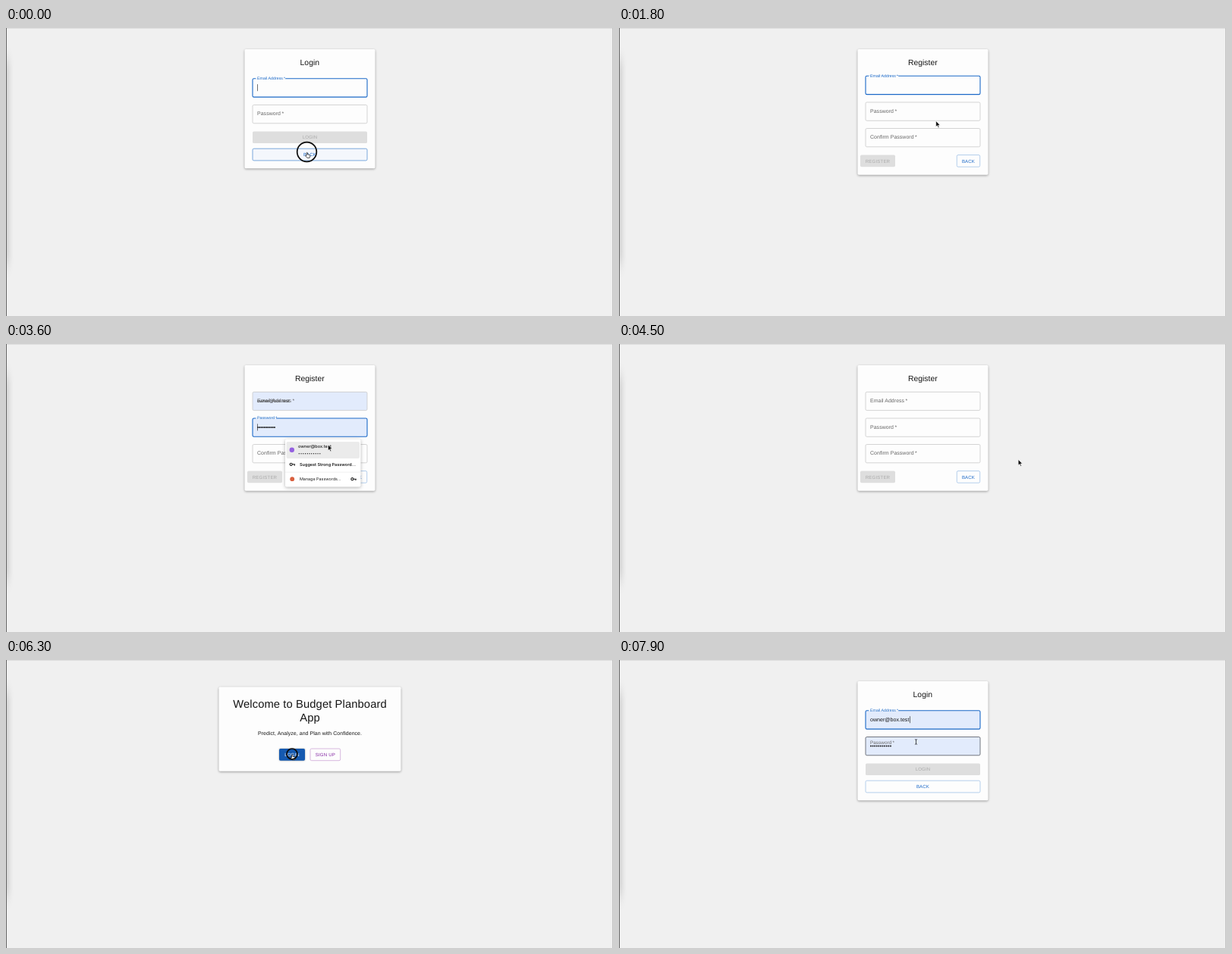
Recreate the animation shown at these times as an HTML page. Size 800x380 px, loop 8 s.

```html
<!DOCTYPE html>
<html lang="en">
<head>
<meta charset="utf-8">
<title>Login flow</title>
<style>
  html, body { margin: 0; width: 100%; height: 100%; overflow: hidden; background: #f0f0f0; }
  svg { display: block; width: 100%; height: 100%; }
  text {
    font-family: "Liberation Sans", Arial, Helvetica, sans-serif;
    text-rendering: geometricPrecision; white-space: pre;
  }
  .menu text { font-family: Inter, Roboto, sans-serif; fill: #1c1c1c; }
  .card { fill: #fdfdfd; filter: drop-shadow(0 1px 1.5px rgba(0,0,0,.36)); }
  .sheet { fill: #fff; filter: drop-shadow(0 1px 2px rgba(0,0,0,.3)); }
</style>
</head>
<body>
<svg viewBox="0 0 800 380" preserveAspectRatio="none">
  <defs>
    <linearGradient id="edge">
      <stop offset="0" stop-color="#000" stop-opacity=".13"/>
      <stop offset="1" stop-color="#000" stop-opacity="0"/>
    </linearGradient>
    <filter id="soft" x="-1" width="3"><feGaussianBlur stdDeviation="1 9"/></filter>
  </defs>
  <rect width="800" height="380" fill="#f0f0f0"/>
  <rect x="0" y="42" width="9" height="270" fill="url(#edge)" filter="url(#soft)"/>
  <rect width="800" height="1" fill="#dedede"/>
  <rect width="1" height="380" fill="#666"/>
  <rect x="799" width="1" height="380" fill="#c4c4c4"/>
  <g id="view"></g>
</svg>
<script>
const view = document.getElementById('view');
const STEP = 100, STEPS = 80;
const BLUE = '#1b69c8', PURPLE = '#8526a3', GREY = '#666';
const MAIL = 'owner@box.test';

// pointer path: step, x, y
const PATH = [
  [0, 396.5, 163.5], [3, 396.5, 163.5], [9, 419, 124], [17, 419, 124],
  [22, 407, 111], [24, 407, 111], [26, 407.5, 128], [31, 489, 171],
  [35, 431, 152], [36, 424.5, 133], [37, 424.5, 133], [42, 534, 150],
  [44, 534, 150], [49, 459, 173], [52, 459, 173], [57, 402.5, 145],
  [61, 377, 124], [66, 377, 124], [69, 377, 80], [73, 377, 80],
  [76, 391.5, 108], [80, 391.5, 108]
];
const CLICKS = [0, 10, 23, 43, 50, 62, 70, 77];

const text = (x, y, size, str, fill = '#161616', extra = '') =>
  `<text x="${x}" y="${y}" font-size="${size}" fill="${fill}" ${extra}>${str}</text>`;
const mid = (x, y, size, str, fill, extra = '') =>
  text(x, y, size, str, fill, `text-anchor="middle" ${extra}`);
const rect = (x, y, w, h, attrs) =>
  `<rect x="${x}" y="${y}" width="${w}" height="${h}" ${attrs}/>`;
const dots = (x, y, gap, size) =>
  `<path d="M${x} ${y}h${gap * 10 + .1}" stroke="#111" stroke-width="${size}" stroke-linecap="round" stroke-dasharray="0 ${gap}"/>`;
const inside = (p, x, y, w, h) => p.x >= x && p.x <= x + w && p.y >= y && p.y <= y + h;

function pointer(k) {
  const i = Math.max(1, PATH.findIndex(q => q[0] >= k));
  const [a, ax, ay] = PATH[i - 1], [b, bx, by] = PATH[i];
  const u = (k - a) / (b - a), e = u * u * (3 - 2 * u);
  return { x: ax + (bx - ax) * e, y: ay + (by - ay) * e, kind: 'arrow' };
}

// label progress, counted from the step a field gains focus
const rise = n => n <= 0 ? 0 : n === 1 ? .35 : 1;
const blink = n => Math.floor(n / 5) % 2 === 0;

function card(x, y, w, h) {
  return rect(x, y, w, h, 'rx="1.7" class="card"');
}

function field(p, y, label, o = {}) {
  const hover = !o.covered && inside(p, 325, y, 151, 24.3);
  if (hover) p.kind = 'beam';
  const up = o.up || 0, size = 6.94 - 1.74 * up;
  const stroke = o.focus ? BLUE : hover ? '#3c4048' : '#c3c3c3';
  let s = rect(325, y, 151, 24.3,
    `rx="1.7" fill="${o.fill ? '#e2ebfc' : 'none'}" stroke="${stroke}" stroke-width="${o.focus ? 1.1 : .7}"`);
  if (up === 1) s += rect(329.3, y - .8, label.length * 2.42 + 7.4, 1.7, 'fill="#fdfdfd"');
  if (o.text) s += text(331, y + 14.1, o.textSize, o.text);
  if (o.dots) s += dots(332, y + 12, o.dots, 1.9);
  s += text(331, y + 13.9 - 12.7 * up, size, label + '\u2009*', o.focus ? BLUE : GREY,
    'letter-spacing=".06"');
  if (o.caret) s += rect(o.caret, y + 7.4, .7, 9, 'fill="#333"');
  return s;
}

function button(p, x, y, w, label, style) {
  const hover = style !== 'off' && inside(p, x, y, w, 15.7);
  if (hover) p.kind = 'hand';
  const looks = {
    off: ['#dedede', 'none', '#aaa'],
    solid: [hover ? '#1559b0' : BLUE, 'none', '#fff'],
    blue: [hover ? '#f4f7fc' : 'none', hover ? '#5b93d4' : '#a3c3e8', BLUE],
    purple: [hover ? '#f9f3fa' : 'none', hover ? '#a45bb8' : '#cda6d6', PURPLE]
  };
  const [fill, line, ink] = looks[style];
  const lift = style === 'solid' ? 'style="filter:drop-shadow(0 .6px .8px rgba(0,0,0,.35))"' : '';
  return rect(x, y, w, 15.7, `rx="1.7" fill="${fill}" stroke="${line}" stroke-width=".8" ${lift}`) +
    mid(x + w / 2, y + 10, 6.07, label, ink, 'letter-spacing=".17"');
}

const keyIcon = (x, y) =>
  `<g transform="translate(${x} ${y})" fill="none" stroke="#222" stroke-width="1.1">
    <circle cx="-1.6" r="1.6"/><path d="M0 0H3.8M2.9 0V1.9"/></g>`;

function menu(p, y, w, suggest) {
  const h = suggest ? 63 : 45.5, last = y + h - 10.3;
  const rows = suggest ? [[3.5, 22], [25.5, 16], [44, 17.5]] : [[2.5, 22], [28, 16]];
  let s = '<g class="menu">' + rect(368, y, w, h, 'rx="2" class="sheet"');
  if (inside(p, 368, y, w, h)) p.kind = 'arrow';
  for (const [dy, rh] of rows)
    if (inside(p, 369, y + dy, w - 2, rh))
      s += rect(369.5, y + dy, w - 3, rh, 'rx="2" fill="#ebebeb"');
  const top = y + (suggest ? 9.5 : 8.7);
  s += '<circle cx="376.8" cy="' + (top + 4.8) + '" r="3.2" fill="#9460e0"/>' +
    text(385, top + 2, 5.6, MAIL, '', 'font-weight="500"') + dots(386.3, top + 9.7, 2.75, 1.3);
  if (suggest)
    s += keyIcon(377.3, y + 33.3) +
      text(387, y + 35.3, 5.5, 'Suggest Strong Password...', '', 'font-weight="600"');
  s += rect(368, last - 9.4, w, .5, 'fill="#e2e2e2"') +
    `<circle cx="377.2" cy="${last}" r="2.9" fill="#d9603f"/>` +
    text(387, last + 2, 5.4, 'Manage Passwords...', '', 'font-weight="400"') +
    keyIcon(368 + w - 9.5, last) + '</g>';
  return s;
}

function welcome(p) {
  return card(280.5, 35.5, 240, 111.3) +
    mid(400.5, 63.2, 14.75, 'Welcome to Budget Planboard', '#161616', 'letter-spacing=".1"') +
    mid(400.5, 81.4, 14.75, 'App', '#161616', 'letter-spacing=".1"') +
    mid(400.5, 99.2, 6.94, 'Predict, Analyze, and Plan with Confidence.', '#161616', 'letter-spacing=".065"') +
    button(p, 360, 117, 34, 'LOGIN', 'solid') +
    button(p, 401, 117, 39.7, 'SIGN UP', 'purple');
}

function login(p, k) {
  const open = k >= 71 && k < 79, done = k >= 79;
  const peek = open && inside(p, 369, 97.5, 92, 22);
  const fresh = k >= 64;
  const caretOn = !fresh || done || blink(k - 63);
  return card(314.5, 28, 172, 157.3) +
    mid(400.3, 49, 10.4, 'Login') +
    field(p, 66.8, 'Email Address', {
      focus: true, up: fresh ? rise(k - 64) : 1, fill: peek || done,
      text: (peek || done) && MAIL, textSize: done ? 7.1 : 5.9,
      caret: caretOn && (done ? 383 : 331)
    }) +
    field(p, 101.5, 'Password', {
      fill: peek || done, dots: done ? 2.6 : peek && 2.2, up: done ? .35 : 0, covered: open
    }) +
    button(p, 325, 136.4, 151, 'LOGIN', 'off') +
    button(p, 325, 159.2, 151, 'BACK', 'blue') +
    (open ? menu(p, 95, 94.5, false) : '');
}

function register(p, k) {
  const open = k >= 24 && k < 43;
  const peek = open && inside(p, 369, 129, 97, 22);
  const onMail = k < 23, onPass = k >= 23 && k < 43;
  return card(314.5, 28, 172, 165.8) +
    mid(400.3, 49, 10.4, 'Register') +
    field(p, 63.3, 'Email Address', {
      focus: onMail, up: onMail ? rise(k - 12) : 1 - rise(k - 23), fill: peek,
      text: peek && MAIL, textSize: 5.9, caret: onMail && blink(k - 11) && 331
    }) +
    field(p, 98, 'Password', {
      focus: onPass, up: onPass ? rise(k - 23) : k < 43 ? 0 : 1 - rise(k - 43), fill: peek,
      dots: peek && 2.2, caret: onPass && blink(k - 23) && 331
    }) +
    field(p, 132.5, 'Confirm Password', { covered: open }) +
    button(p, 318, 167.5, 46, 'REGISTER', 'off') +
    button(p, 445.3, 167.5, 30.4, 'BACK', 'blue') +
    (open ? menu(p, 125.5, 99.5, true) : '');
}

const SHAPES = {
  arrow: '<path d="M0 0V7.6L1.8 6L3 8.8L4.2 8.3L3 5.5H5.4Z" fill="#000" stroke="#fff" stroke-width=".6"/>',
  hand: '<path d="M-.4 1.2Q.4 .2 1 1.3V3.3L3.7 4Q4.5 4.3 4.3 5.3L3.6 7.8H.3L-2 5Q-1.7 4 -.4 4.9Z" fill="#fff" stroke="#111" stroke-width=".7" stroke-linejoin="round"/>',
  beam: '<path d="M-1.5 -3.3Q0 -3.3 0 -2.3Q0 -3.3 1.5 -3.3M0 -2.3V2.3M-1.5 3.3Q0 3.3 0 2.3Q0 3.3 1.5 3.3" fill="none" stroke="#222" stroke-width=".8"/>'
};

function ring(k) {
  const c = CLICKS.find(n => k === n || k === n + 1);
  if (c === undefined) return '';
  return `<circle r="${k === c ? 12.8 : 7}" fill="none" stroke="#0b0b0b" stroke-width="1.7"/>`;
}

function draw(k) {
  const p = pointer(k);
  const page = k < 2 || k >= 64 ? login : k >= 12 && k < 52 ? register : welcome;
  const body = page(p, k);
  view.innerHTML = body +
    `<g transform="translate(${p.x} ${p.y})">${SHAPES[p.kind]}${ring(k)}</g>`;
}

let shown = -1;
const start = performance.now();
function tick() {
  const k = Math.floor((performance.now() - start) / STEP) % STEPS;
  if (k !== shown) draw(shown = k);
  requestAnimationFrame(tick);
}
tick();
</script>
</body>
</html>
```
